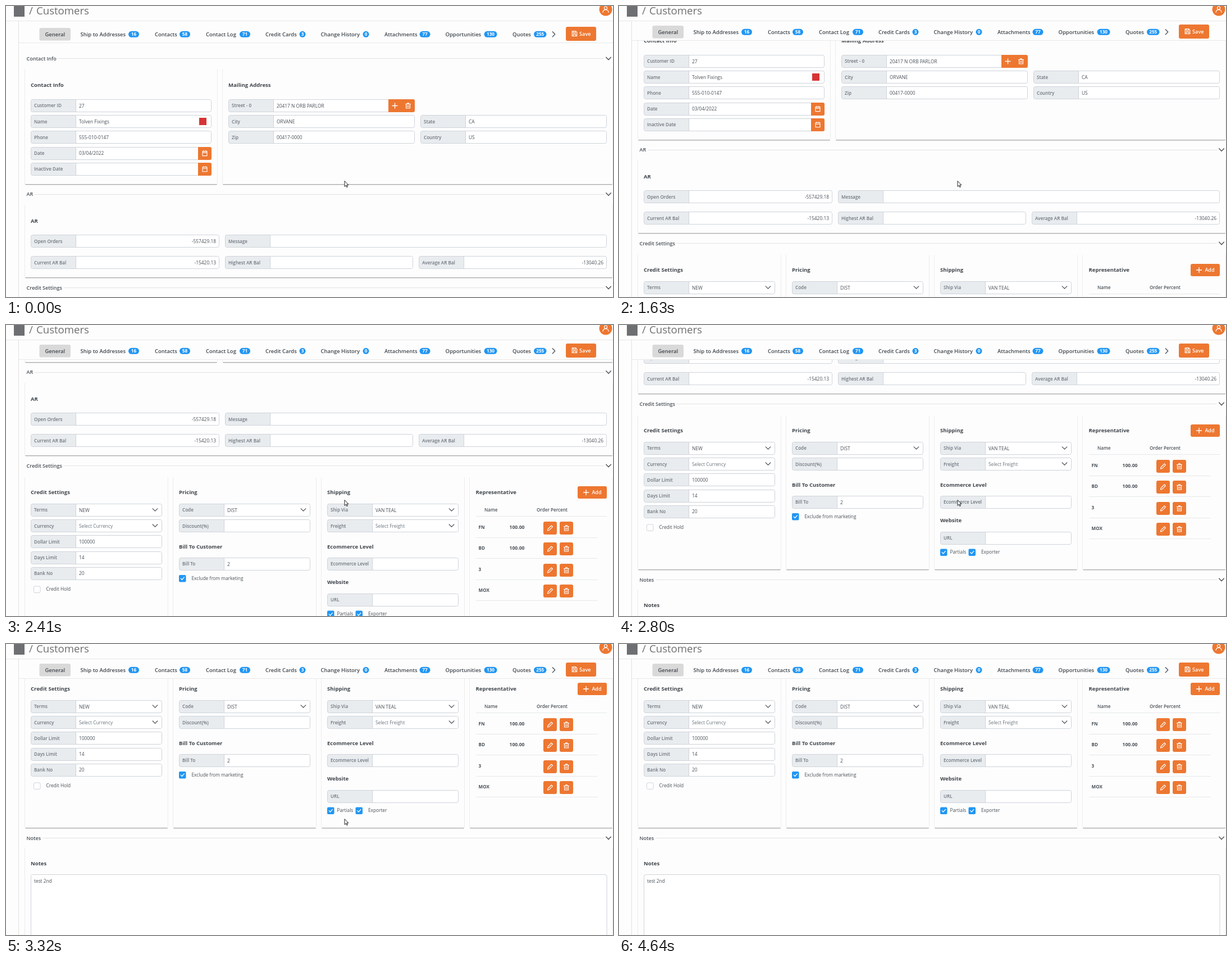
Recreate the animation shown at these times as an HTML page with a canvas. Size 1081 by 518 pixels, loop 5.58 s.

```html
<!DOCTYPE html>
<html lang="en">
<head>
<meta charset="utf-8">
<title>Customers</title>
<style>
html, body { margin: 0; width: 100%; height: 100%; overflow: hidden; background: #fdfdfd; }
canvas { display: block; width: 1081px; height: 518px; }
</style>
</head>
<body>
<canvas id="stage"></canvas>
<script>
const W = 1081, H = 518, LOOP = 5580;
const BG = '#fdfdfd', ORANGE = '#ed7731', BLUE = '#2196f3', BORDER = '#ced4da';
const INK = '#495057', MUTED = '#6c757d', DARK = '#3f454b';
const canvas = document.getElementById('stage');
const ctx = canvas.getContext('2d');
const dpr = window.devicePixelRatio || 1;
canvas.width = W * dpr;
canvas.height = H * dpr;

// [time, scroll offset]; each value holds until the next
const SCROLL = [
  [0, 0], [400, 16], [530, 51], [660, 63],
  [1630, 79], [1760, 140], [1890, 188],
  [2150, 204], [2280, 240], [2410, 251],
  [2670, 288], [2800, 361], [2930, 415], [3060, 449], [3190, 465], [3320, 469]
];

const ICONS = {
  calendar: 'M-4-3.5h8v8h-8zM-4-1h8M-2-5v2M2-5v2',
  trash: 'M-4.5-3h9M-3.5-3v7.5h7v-7.5M-1.5-3v-1.6h3v1.6M-1.2-.8v3.2M1.2-.8v3.2',
  pencil: 'M-4.5 4.5l.8-3 6-6 2.2 2.2-6 6z',
  plus: 'M-4.5 0h9M0-4.5v9',
  save: 'M-4.3-4.3h6.6l2 2v6.6h-8.6zM-2.3-4.3v2.8h4v-2.8M-2.3 4.3v-3.4h4.6v3.4',
  user: 'M-2.6-2.6a2.6 2.6 0 1 0 5.2 0a2.6 2.6 0 1 0-5.2 0M-5 5.2c0-6 10-6 10 0',
  check: 'M-3 0l2.2 2.3 4-4.6',
  down: 'M-4.3-2.2l4.3 4.4 4.3-4.4',
  right: 'M-2.2-4.5l4.4 4.5-4.4 4.5'
};
for (const name in ICONS) ICONS[name] = new Path2D(ICONS[name]);
const ARROW = new Path2D('M.5.5v10l2.3-2.2 1.6 3.4 1.5-.7-1.6-3.3h3.1z');
const IBEAM = new Path2D('M-2-6h1.5l.5.5.5-.5h1.5M0-5.5v11M-2 6h1.5l.5-.5.5.5h1.5');

function text(str, x, cy, size, weight, color, align = 'left') {
  ctx.font = `${weight} ${size}px "Open Sans", "Noto Sans", sans-serif`;
  ctx.fillStyle = color;
  ctx.textAlign = align;
  ctx.fillText(str, x, Math.round(cy + size * 0.36));
}

function box(x, y, w, h, radius, fill, stroke) {
  ctx.beginPath();
  ctx.roundRect(x, y, w, h, radius);
  if (fill) { ctx.fillStyle = fill; ctx.fill(); }
  if (stroke) { ctx.strokeStyle = stroke; ctx.lineWidth = 1; ctx.stroke(); }
}

function rect(x, y, w, h, color) {
  ctx.fillStyle = color;
  ctx.fillRect(x, y, w, h);
}

function icon(name, x, y, color = '#fff', width = 1.1) {
  ctx.save();
  ctx.translate(x, y);
  ctx.strokeStyle = color;
  ctx.lineWidth = width;
  ctx.lineCap = ctx.lineJoin = 'round';
  ctx.stroke(ICONS[name]);
  ctx.restore();
}

const heading = (str, x, cy) => text(str, x, cy, 9.55, 700, DARK);

function legend(str, cy) {
  text(str, 36.5, cy, 9, 600, INK);
  const start = 40 + Math.round(ctx.measureText(str).width);
  ctx.setLineDash([1, 1]);
  ctx.strokeStyle = '#c9c9c9';
  ctx.lineWidth = 1;
  ctx.beginPath();
  ctx.moveTo(start, Math.floor(cy) + 0.5);
  ctx.lineTo(1065, Math.floor(cy) + 0.5);
  ctx.stroke();
  ctx.setLineDash([]);
  icon('down', 1073, cy, INK, 1.4);
}

function card(left, right, top, bottom) {
  rect(left - 1, top, 1, bottom - top - 2, '#ededed');
  rect(right, top, 1, bottom - top - 2, '#ededed');
  rect(left, bottom - 1, right - left, 1, '#adadad');
  rect(left + 1, bottom, right - left - 2, 1, '#dedede');
}

// opt: select, hint, alignRight, button
function field(left, right, cy, label, value = '', opt = {}) {
  const y = Math.round(cy - 11.5) + 0.5, x = left + 0.5, w = right - left - 1;
  box(x, y, w, 22, 3, '#fff');
  box(x, y, 80, 22, [3, 0, 0, 3], '#e9ecef');
  rect(left + 80, y, 1, 22, BORDER);
  box(x, y, w, 22, 3, null, BORDER);
  text(label, left + 6, cy, 8.15, 600, MUTED);
  if (opt.alignRight) text(value, right - 6, cy, 8.4, 400, INK, 'right');
  else text(value, left + 86, cy, 8.35, 400, opt.hint ? MUTED : INK);
  if (opt.select) icon('down', right - 12.5, cy - 0.5, INK, 1.2);
  if (opt.button) {
    box(right - 24, y - 0.5, 24, 23, [0, 3, 3, 0], ORANGE);
    icon(opt.button, right - 12, cy);
  }
}

function checkbox(x, cy, label, textX, on) {
  if (on) {
    box(x, cy - 6, 12.5, 12.5, 2, BLUE);
    icon('check', x + 6.2, cy + 0.2, '#fff', 1.2);
  } else {
    box(x + 0.5, cy - 5.5, 11.5, 11.5, 2, '#fff', BORDER);
  }
  text(label, textX, cy, 8.3, 400, INK);
}

function contactSection() {
  legend('Contact Info', 93.5);
  card(34, 376, 112, 318);
  card(386, 1080, 112, 318);
  heading('Contact Info', 44, 141);
  heading('Mailing Address', 396, 141);
  const row = i => 177.5 + 28.2 * i;
  field(44, 366, row(0), 'Customer ID', '27');
  field(44, 366, row(1), 'Name', 'Tolven Fixings');
  rect(344, 199, 13, 13, '#d63434');
  field(44, 366, row(2), 'Phone', '555-010-0147');
  field(44, 366, row(3), 'Date', '03/04/2022', { button: 'calendar' });
  field(44, 366, row(4), 'Inactive Date', '', { button: 'calendar' });
  field(396, 728, row(0), 'Street - 0', '20417 N ORB PARLOR', { button: 'trash' });
  rect(681, 166, 24, 23, ORANGE);
  icon('plus', 692.5, 177.5, '#fff', 1.3);
  field(396, 728, row(1), 'City', 'ORVANE');
  field(396, 728, row(2), 'Zip', '00417-0000');
  field(738, 1070, row(1), 'State', 'CA');
  field(738, 1070, row(2), 'Country', 'US');
}

function arSection() {
  const right = { alignRight: true };
  legend('AR', 335);
  card(34, 1080, 354, 484);
  heading('AR', 44, 383);
  field(44, 380, 418.8, 'Open Orders', '-557429.18', right);
  field(390, 1070, 418.8, 'Message');
  field(44, 380, 456.8, 'Current AR Bal', '-15420.13', right);
  field(390, 725, 456.8, 'Highest AR Bal');
  field(735, 1070, 456.8, 'Average AR Bal', '-13040.26', right);
}

function creditSection() {
  const row = i => 580.5 + 28.2 * i;
  const select = { select: true }, hint = { select: true, hint: true };
  legend('Credit Settings', 501.5);
  for (let i = 0; i < 4; i++) card(34 + 264 * i, 288 + 264 * i, 522, 797);

  heading('Credit Settings', 44, 549);
  field(44, 278, row(0), 'Terms', 'NEW', select);
  field(44, 278, row(1), 'Currency', 'Select Currency', hint);
  field(44, 278, row(2), 'Dollar Limit', '100000');
  field(44, 278, row(3), 'Days Limit', '14');
  field(44, 278, row(4), 'Bank No', '20');
  checkbox(49, 721.5, 'Credit Hold', 71.5, false);

  heading('Pricing', 308, 549);
  field(308, 542, row(0), 'Code', 'DIST', select);
  field(308, 542, row(1), 'Discount(%)');
  heading('Bill To Customer', 308, 646);
  field(308, 542, 676.5, 'Bill To', '2');
  checkbox(308, 702, 'Exclude from marketing', 330.5, true);

  heading('Shipping', 572, 549);
  field(572, 806, row(0), 'Ship Via', 'VAN TEAL', select);
  field(572, 806, row(1), 'Freight', 'Select Freight', hint);
  heading('Ecommerce Level', 572, 646);
  field(572, 806, 676.5, 'Ecommerce Level');
  heading('Website', 572, 708.5);
  field(572, 806, 740, 'URL');
  checkbox(572, 765.5, 'Partials', 589.5, true);
  checkbox(622.5, 765.5, 'Exporter', 645, true);

  heading('Representative', 836.5, 549);
  box(1018, 538, 52, 22, 3, ORANGE);
  icon('plus', 1033, 549, '#fff', 1.3);
  text('Add', 1043.5, 549, 8.9, 600, '#fff');
  text('Name', 852, 580.5, 8.1, 600, INK);
  text('Order Percent', 945, 580.5, 8.1, 600, INK);
  rect(837, 591, 233, 1, '#e6e8ea');
  ['FN', 'BD', '3', 'MOX'].forEach((rep, i) => {
    const y = Math.round(610.5 + 37.6 * i);
    text(rep, 841.5, y, 8.1, 700, INK);
    if (i < 2) text('100.00', 896.5, y, 8.6, 700, INK);
    box(957, y - 10, 24, 23, 3, ORANGE);
    box(986, y - 10, 24, 23, 3, ORANGE);
    icon('pencil', 969, y + 1.5);
    icon('trash', 998, y + 1.5);
    rect(837, y + 18, 217, 1, '#e6e8ea');
  });
}

function notesSection(hover) {
  legend('Notes', 814.5);
  card(34, 1080, 832, 1100);
  heading('Notes', 44, 860);
  box(44.5, 879.5, 1025.5, 180, 3, '#fff', BORDER);
  if (hover) {
    ctx.globalAlpha = hover;
    box(44.5, 879.5, 1025.5, 180, 3, null, BLUE);
    ctx.globalAlpha = 1;
  }
  text('test 2nd', 50, 891, 8.35, 400, INK);
}

// [label, x, count, badge x, badge width]
const TABS = [
  ['Ship to Addresses', 132.5, 16, 218, 19], ['Contacts', 265, 58, 309, 19],
  ['Contact Log', 356, 71, 416, 19], ['Credit Cards', 462, 3, 522.5, 11],
  ['Change History', 560.5, 0, 635.5, 11], ['Attachments', 674, 77, 736.5, 19],
  ['Opportunities', 782.5, 130, 851.5, 23], ['Quotes', 902, 255, 940, 22.5]
];

function tabBar(cy) {
  rect(23, 27, W, cy - 12, BG);
  rect(23, cy + 15, W, 1, '#e9e9e9');
  box(59.5, cy - 11, 55.5, 22.5, 3, '#d9d9d9');
  text('General', 69.5, cy + 0.3, 9.45, 600, DARK);
  for (const [label, x, count, bx, bw] of TABS) {
    text(label, x, cy + 0.3, 9.45, 600, DARK);
    box(bx, cy - 5.2, bw, 11, 5.5, BLUE);
    text(String(count), bx + bw / 2, cy + 0.3, 8.2, 700, '#fff', 'center');
  }
  icon('right', 975.5, cy + 0.3, INK, 1.3);
  box(997, cy - 13, 54, 25, 3, ORANGE);
  icon('save', 1012.5, cy - 0.8);
  text('Save', 1021, cy - 0.6, 9.2, 600, '#fff');
}

function header() {
  rect(0, 0, W, 26, BG);
  rect(0, 26, W, 1, '#e7e7e7');
  rect(22, 26, 1, H, '#e2e2e2');
  rect(14, 0, 19, 19, '#6e6f72');
  text('/', 41, 8.5, 18.6, 400, '#6f6f6f');
  text('Customers', 54, 8.5, 18.6, 400, '#6f6f6f');
  ctx.beginPath();
  ctx.arc(1068, 6, 11.5, 0, Math.PI * 2);
  ctx.fillStyle = ORANGE;
  ctx.fill();
  icon('user', 1068, 6, '#fff', 1.2);
}

const bezier = (a, b, c, p) => (1 - p) ** 2 * a + 2 * p * (1 - p) * b + p * p * c;

function pointer(t) {
  if (t >= 4640) return null;
  if (t >= 4250) {
    const k = Math.floor((t - 4250) / 130);
    return { x: 936 + 7 * k, y: 366 + 64 * k, beam: k > 0 };
  }
  const p = t < 3730 ? 0 : Math.min(4, Math.floor((t - 3730) / 126.5) + 1) / 4;
  return { x: bezier(602.5, 770, 930, p), y: bezier(311, 198, 304, p) };
}

function drawPointer(p) {
  ctx.save();
  ctx.translate(p.x, p.y);
  ctx.lineWidth = 1;
  ctx.strokeStyle = '#222';
  if (p.beam) {
    ctx.stroke(IBEAM);
  } else {
    ctx.fillStyle = '#fff';
    ctx.fill(ARROW);
    ctx.stroke(ARROW);
  }
  ctx.restore();
}

function draw(t) {
  const scroll = SCROLL.findLast(step => step[0] <= t)[1];
  const mouse = pointer(t);
  const hover = mouse && mouse.beam ? (t < 4510 ? 0.6 : 1) : 0;
  ctx.setTransform(dpr, 0, 0, dpr, 0, 0);
  rect(0, 0, W, H, BG);
  ctx.save();
  ctx.translate(0, -scroll);
  contactSection();
  arSection();
  creditSection();
  notesSection(hover);
  ctx.restore();
  tabBar(50 - Math.min(scroll, 4));
  header();
  if (mouse) drawPointer(mouse);
}

const start = performance.now();
function tick() {
  draw((performance.now() - start) % LOOP);
  requestAnimationFrame(tick);
}
tick();
</script>
</body>
</html>
```
